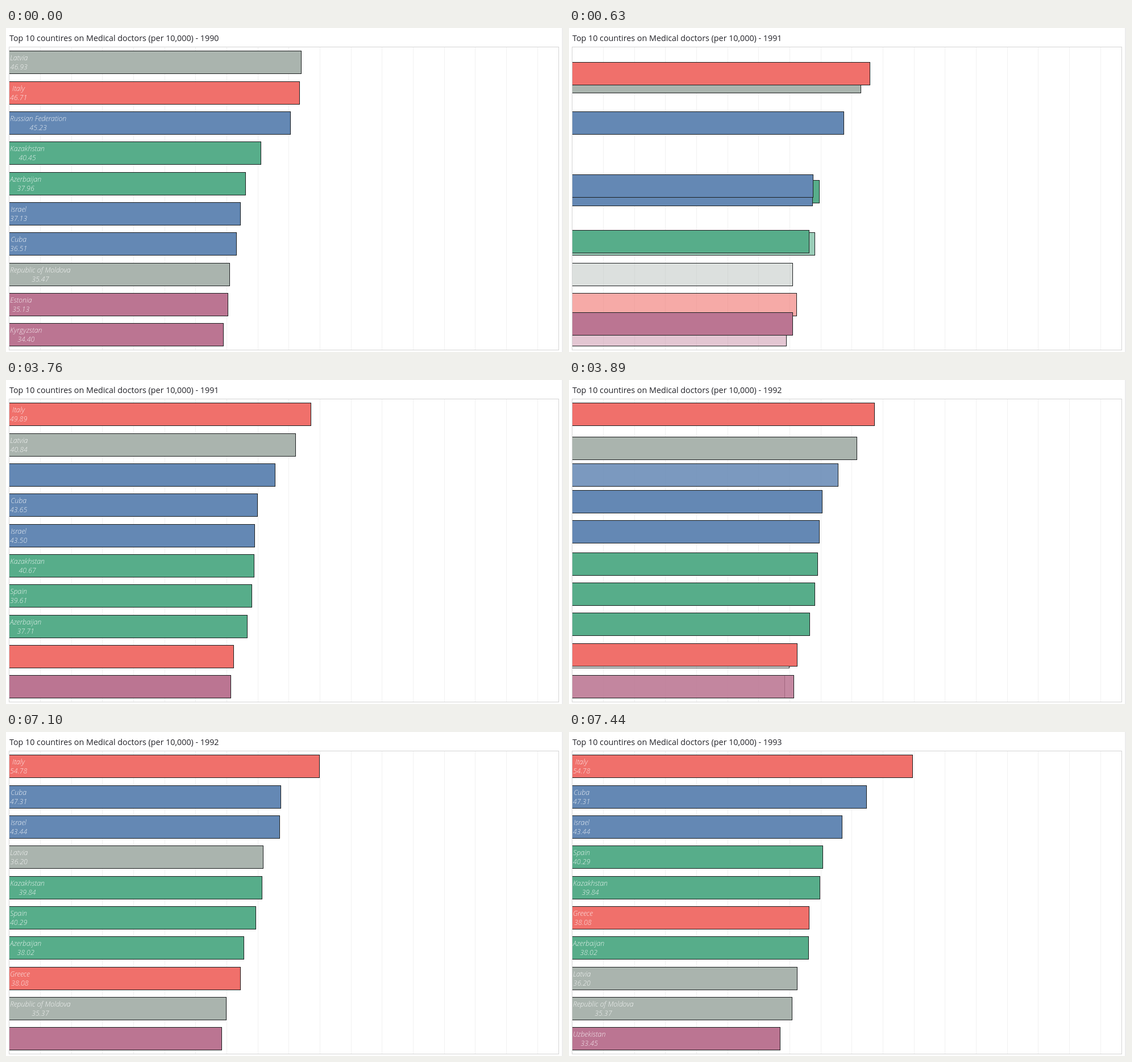
An HTML page with a canvas that plays this animation: 980x571 px, repeating every 8 s.

```html
<!DOCTYPE html>
<html lang="en">
<head>
<meta charset="utf-8">
<style>
  html, body { margin: 0; width: 100%; height: 100%; overflow: hidden; background: #fff; }
  canvas { display: block; }
</style>
</head>
<body>
<canvas id="stage" width="980" height="571"></canvas>
<script>
const ctx = document.getElementById('stage').getContext('2d');
const LOOP = 8000, MORPH = 300;
const LEFT = 6, UNIT = 10.93, ROW = 53.33, TOP = 40.8, BAR = 40;
const FONT = '"Open Sans", "Noto Sans", sans-serif';

const groups = {
  '#aab4ae': ['Latvia', 'Republic of Moldova'],
  '#f0706b': ['Italy', 'Greece'],
  '#6488b4': ['Russian Federation', 'Israel', 'Cuba'],
  '#57ad8a': ['Kazakhstan', 'Azerbaijan', 'Spain'],
  '#bb7592': ['Estonia', 'Kyrgyzstan', 'Uzbekistan']
};
const colors = {};
for (const color in groups) for (const name of groups[color]) colors[name] = color;

// One ranking per year, starting with 1990
const years = [
  'Latvia 46.93,Italy 46.71,Russian Federation 45.23,Kazakhstan 40.45,Azerbaijan 37.96,Israel 37.13,Cuba 36.51,Republic of Moldova 35.47,Estonia 35.13,Kyrgyzstan 34.40',
  'Italy 48.49,Latvia 46.06,Russian Federation 42.72,Cuba 39.94,Israel 39.47,Kazakhstan 39.40,Spain 39.01,Azerbaijan 38.23,Greece 36.10,Estonia 35.65',
  'Italy 49.89,Cuba 43.65,Israel 43.50,Latvia 40.84,Kazakhstan 40.67,Spain 39.61,Azerbaijan 37.71,Greece 37.18,Republic of Moldova 34.89,Kyrgyzstan 34.12',
  'Italy 54.78,Cuba 47.31,Israel 43.44,Spain 40.29,Kazakhstan 39.84,Greece 38.08,Azerbaijan 38.02,Latvia 36.20,Republic of Moldova 35.37,Uzbekistan 33.45'
].map(list => Object.fromEntries(list.split(',').map((entry, rank) => {
  const [, name, value] = entry.match(/(.+) (.+)/);
  return [name, { rank, value: +value }];
})));

// The picture only refreshes at the listed offsets from `start`
const longSteps = [0, 70, 140, 210, 270, 340];
const changes = [
  { start: 500, morphStart: 452, steps: [0, 60, 130, 200, 270] },
  { start: 3760, morphStart: 3785, steps: longSteps, unlabelled: 'Greece' },
  { start: 7100, morphStart: 7125, steps: longSteps }
];

const mix = (a, b, k) => a + (b - a) * k;
const smooth = k => k * k * (3 - 2 * k);
const snap = v => Math.floor(v) + 0.5;
const barTop = rank => snap(TOP + rank * ROW);

function drawFrame(year) {
  ctx.fillStyle = '#fff';
  ctx.fillRect(0, 0, 980, 571);
  ctx.fillStyle = '#ececec';
  ctx.fillRect(978, 0, 2, 571);
  ctx.fillStyle = '#f1f1f1';
  for (let i = 1; i <= 17; i++) ctx.fillRect(Math.floor(LEFT + i * 5 * UNIT), 34, 1, 533);
  ctx.lineWidth = 1;
  ctx.strokeStyle = '#d4d4d4';
  ctx.strokeRect(5.5, 33.5, 967, 534);
  ctx.fillStyle = '#222228';
  ctx.textAlign = 'left';
  ctx.font = '500 14.3px ' + FONT;
  ctx.fillText('Top 10 countires on Medical doctors (per 10,000) - ' + year, 6, 23);
}

function drawBar(name, rank, value, alpha) {
  const y = barTop(rank);
  const right = snap(LEFT + 0.2 + value * UNIT);
  ctx.save();
  ctx.beginPath();
  ctx.rect(LEFT, 34, 966, 533);
  ctx.clip();
  ctx.globalAlpha = alpha;
  ctx.fillStyle = colors[name];
  ctx.fillRect(LEFT, y, right - LEFT, BAR);
  ctx.globalAlpha = 1;
  ctx.strokeStyle = '#1c1f20';
  ctx.strokeRect(LEFT - 5, y, right - LEFT + 5, BAR);
  ctx.restore();
}

function drawLabel(name, rank, value) {
  const y = barTop(rank), number = value.toFixed(2);
  ctx.font = 'italic 300 12.4px ' + FONT;
  ctx.fillStyle = 'rgba(255,255,255,.85)';
  ctx.textAlign = 'center';
  const x = 7 + Math.max(ctx.measureText(name).width, ctx.measureText(number).width) / 2;
  ctx.fillText(name, x, y + 16.5);
  ctx.fillText(number, x, y + 32.5);
}

function drawStill(index, labels, unlabelled) {
  drawFrame(1990 + index);
  for (const [name, { rank, value }] of Object.entries(years[index])) {
    drawBar(name, rank, value, 1);
    if (labels[name] && name !== unlabelled) drawLabel(name, rank, labels[name].value);
  }
}

function drawMorph(index, progress) {
  const from = years[index], to = years[index + 1], k = smooth(progress);
  drawFrame(1991 + index);
  const names = Object.keys({ ...from, ...to }).sort().reverse();
  for (const name of names) {
    const a = from[name], b = to[name];
    if (a && b) drawBar(name, mix(a.rank, b.rank, k), mix(a.value, b.value, k), 1);
    else if (a) drawBar(name, a.rank, a.value, 1 - progress);
    else drawBar(name, b.rank, b.value, progress);
  }
}

function render(t) {
  const index = changes.filter(c => t >= c.start).length - 1;
  if (index < 0) return drawStill(0, years[0]);
  const { start, morphStart, steps, unlabelled } = changes[index];
  const shown = start + steps.filter(s => s <= t - start).pop();
  const progress = (shown - morphStart) / MORPH;
  if (progress >= 1) drawStill(index + 1, years[index + 1]);
  else if (progress <= 0) drawStill(index, years[index + 1], unlabelled);
  else drawMorph(index, progress);
}

const begin = performance.now();
function tick() {
  render((performance.now() - begin) % LOOP);
  requestAnimationFrame(tick);
}
tick();
</script>
</body>
</html>
```
